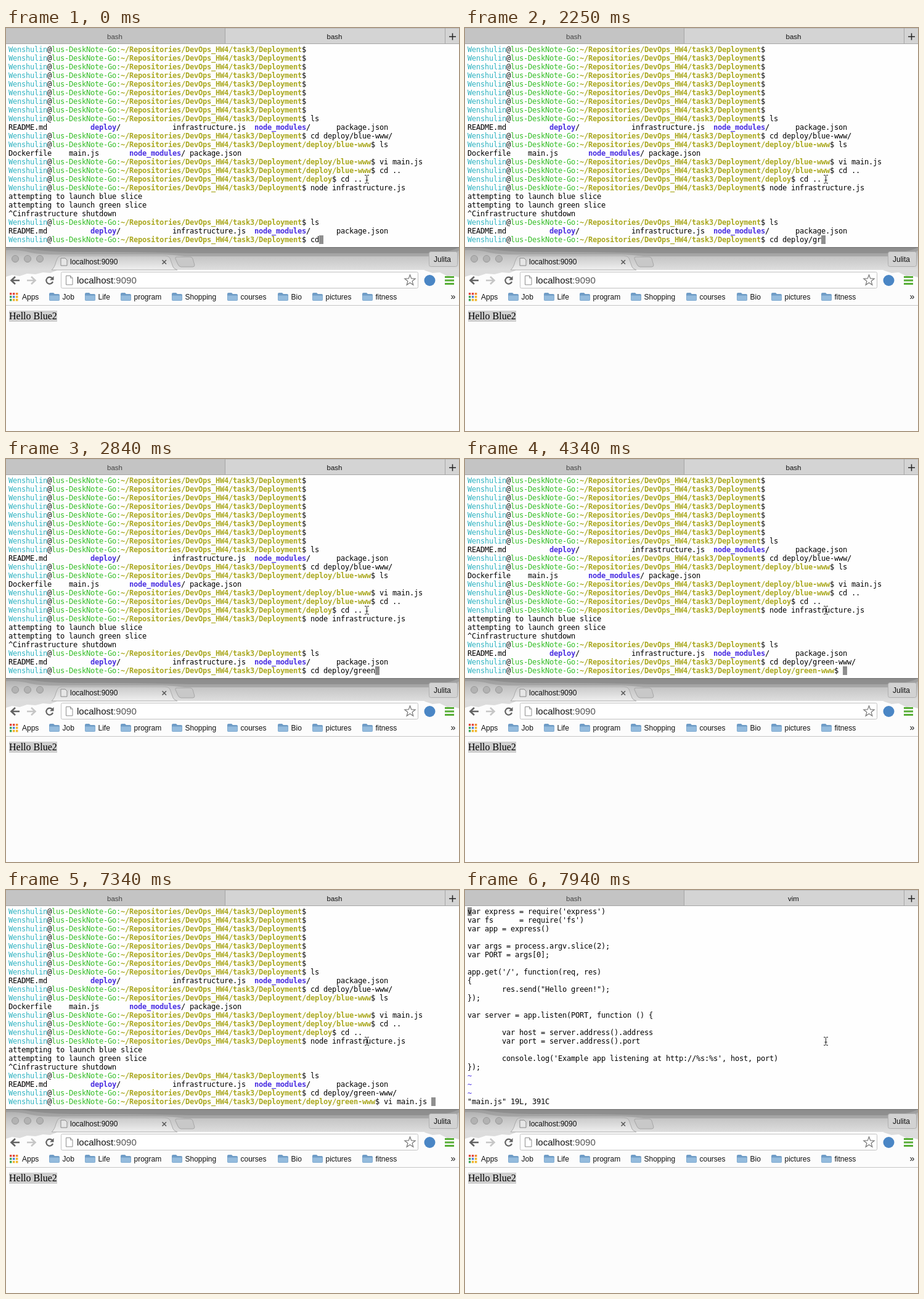
An HTML page for the animation above (8000 ms loop, 735x653 px).

```html
<!DOCTYPE html>
<html lang="en">
<head>
<meta charset="utf-8">
<title>Terminal and browser</title>
<style>
  html, body { margin: 0; width: 100%; height: 100%; overflow: hidden; background: #fcfcfc; }
  #stage { position: absolute; left: 0; top: 0; width: 735px; height: 653px; overflow: hidden; }
  svg { position: absolute; left: 0; top: 0; }
  svg text { font: 12px "Liberation Sans", Arial, sans-serif; fill: #111; }
  svg .title { font-size: 11.5px; text-anchor: middle; }
  svg .url { font-size: 15px; }
  svg .page { font: 16px "Liberation Serif", Times, serif; fill: #000; }
  #term { position: absolute; left: 0; top: 26px; width: 735px; height: 329px; background: #fefefe; }
  #screen {
    position: absolute; left: 4px; top: 2px; margin: 0; color: #000;
    font: 12px/14px "DejaVu Sans Mono", monospace;
    letter-spacing: calc(7px - 1ch); white-space: pre; font-variant-ligatures: none;
  }
  #caret { position: absolute; width: 7px; height: 14px; background: #8f8f8f; }
  #flash { position: absolute; left: 0; top: 3px; right: 0; bottom: 0; background: #9b9b9b; opacity: 0; }
  .user { color: #2fb3c1; }
  .host { color: #34bd26; }
  .path { color: #aaa820; font-weight: bold; }
  .dir { color: #492ee1; font-weight: bold; }
  .tilde { color: #492ee1; }
</style>
</head>
<body>
<div id="stage">
  <svg width="735" height="653" viewBox="0 0 735 653">
    <defs>
      <linearGradient id="strip" x1="0" y1="0" x2="0" y2="1">
        <stop offset="0" stop-color="#a9a9a9"/>
        <stop offset=".45" stop-color="#c6c6c6"/>
        <stop offset="1" stop-color="#dedede"/>
      </linearGradient>
      <linearGradient id="tab" x1="0" y1="0" x2="0" y2="1">
        <stop offset="0" stop-color="#c9c9c9"/>
        <stop offset="1" stop-color="#f0f0f0"/>
      </linearGradient>
      <g id="folder">
        <path d="M0 2q0-2 2-2h5l2 2h6q2 0 2 2v7q0 2-2 2H2q-2 0-2-2z" fill="#6f9cc6"/>
        <path d="M.5 4.5h16V11q0 1.5-1.5 1.5H2Q.5 12.500 .5 11z" fill="#94bbdd"/>
      </g>
    </defs>

    <!-- browser -->
    <rect y="392" width="735" height="261" fill="#fcfcfc"/>
    <path d="M0 388H84L82 393 72 397 60 396 48 399 34 398 22 402 10 400 0 403z" fill="#dcdcdc"/>
    <path d="M672 388H735V404L724 401 716 402 704 396 692 397 680 393z" fill="#dcdcdc"/>
    <rect y="355" width="735" height="37" fill="url(#strip)"/>
    <path d="M74 392Q79 388 81 379L84 372Q86 369 91 369H258Q264 369 266 373L271 387Q273 391 278 392z" fill="url(#tab)" stroke="#aaa"/>
    <path d="M277 371H299Q302 371 303 374L306 384Q306 387 303 387H284Q281 387 279 383L275 374Q274 371 277 371z" fill="#c8c8c8" stroke="#a6a6a6"/>
    <path d="M0 355H735V360Q728 369 690 370H290Q270 367 250 367H100Q60 368 40 364 20 359 0 360z" fill="#939393" opacity=".55"/>
    <path d="M20 355H735Q722 364 680 365H300Q180 362 110 363 60 363 20 355z" fill="#828282" opacity=".6"/>
    <g fill="#b2b2b2" stroke="#999">
      <circle cx="15" cy="374" r="5.500"/><circle cx="35" cy="374" r="5.500"/><circle cx="55" cy="374" r="5.500"/>
    </g>
    <path d="M89 373h7l3 3v9H89z" fill="#e6e6e6" stroke="#888"/>
    <text x="104" y="383">localhost:9090</text>
    <path d="M253.500 376l6.500 6.500m0-6.500l-6.500 6.500" stroke="#555" stroke-width="1.500"/>
    <rect x="686.500" y="362.500" width="46" height="24" rx="3" fill="#d2d2d2" stroke="#b0b0b0"/>
    <text x="694" y="379">Julita</text>

    <!-- toolbar -->
    <g fill="none" stroke-width="2.600">
      <path d="M22 409H9m6-6l-6.500 6 6.500 6" stroke="#636363"/>
      <path d="M34 409H47m-6-6l6.500 6-6.500 6" stroke="#c6c6c6"/>
      <path d="M75 405.500A5.500 5.500 0 1 0 76 411" stroke="#636363" stroke-width="2.200"/>
    </g>
    <path d="M77.500 402v6.500h-6.500z" fill="#636363"/>
    <rect x="89.500" y="395.500" width="579" height="26" rx="2" fill="#fff" stroke="#c2c2c2"/>
    <path d="M97.500 401.500h7l3.500 3.500v11H97.500zM104.500 401.500v3.500h3.500" fill="#fff" stroke="#8d8d8d"/>
    <text class="url" x="115" y="414">localhost<tspan fill="#555">:9090</tspan></text>
    <path id="star" fill="#fff" stroke="#777" stroke-width="1.200"/>
    <circle cx="687.500" cy="409" r="9" fill="#4a86c5"/>
    <path d="M712 403.500h15m-15 5.500h15m-15 5.500h15" stroke="#58ae37" stroke-width="3"/>
    <g id="apps"></g>
    <text x="26" y="440">Apps</text>
    <g id="marks"></g>
    <text x="721.500" y="440" style="font-size:14px">»</text>
    <path d="M0 449.500H735" stroke="#c6c6c6"/>

    <rect x="5" y="458" width="78" height="18" fill="#cfcfcf"/>
    <text class="page" x="5" y="472">Hello Blue2</text>

    <!-- terminal tabs -->
    <rect width="735" height="26" fill="#d4d4d4"/>
    <rect width="355" height="26" fill="#c4c4c4"/>
    <path d="M0 .5H735" stroke="#bcbcbc"/>
    <path d="M355.500 0V26M712.500 0V26M0 25.500H735" stroke="#a5a5a5"/>
    <path d="M719 14h11m-5.500-5.500v11" stroke="#222" stroke-width="1.500"/>
    <text class="title" x="176.500" y="18" style="fill:#444">bash</text>
    <text class="title" id="title" x="533" y="18">bash</text>
  </svg>

  <div id="term">
    <div id="caret"></div>
    <pre id="screen"></pre>
    <div id="flash"></div>
  </div>

  <svg width="735" height="653" viewBox="0 0 735 653">
    <path d="M0 355.500H735" stroke="#6e6e6e"/>
    <path d="M582 238.500h2.500l1 1 1-1H589M582 251.500h2.500l1-1 1 1H589M585.500 239.500v11M583.500 246.500h4" fill="none" stroke="#222"/>
  </svg>
</div>

<script>
const $ = id => document.getElementById(id);
const LOOP = 8000, ROWS = 23, CELL_W = 7, CELL_H = 14;

// ---- static parts of the toolbar ----
$('star').setAttribute('d', 'M' + Array.from({ length: 10 }, (_, i) => {
  const r = i % 2 ? 3.8 : 9, a = i * Math.PI / 5;
  return (655.5 + r * Math.sin(a)).toFixed(1) + ' ' + (409 - r * Math.cos(a)).toFixed(1);
}).join('L') + 'z');

const dots = ['#e2463c', '#e2463c', '#ee8a2c', '#3da555', '#4b80dc', '#efb427', '#3da555', '#efb427', '#efb427'];
$('apps').innerHTML = dots.map((c, i) =>
  `<rect x="${6 + i % 3 * 5}" y="${429 + Math.floor(i / 3) * 5}" width="3.4" height="3.4" fill="${c}"/>`).join('');

const marks = { Job: 70, Life: 128, program: 186, Shopping: 269, courses: 359, Bio: 441, pictures: 497, fitness: 578 };
$('marks').innerHTML = Object.entries(marks).map(([name, x]) =>
  `<use href="#folder" x="${x}" y="429"/><text x="${x + 21.5}" y="440">${name}</text>`).join('');

// ---- terminal content ----
const USER = 'Wenshulin', HOST = 'lus-DeskNote-Go:', ROOT = '~/Repositories/DevOps_HW4/task3/Deployment';
const span = (cls, s) => `<span class="${cls}">${s}</span>`;
const prompt = (cmd = '', sub = '') =>
  span('user', USER) + '@' + span('host', HOST) + span('path', ROOT + sub) + '$ ' + cmd;
const promptLength = sub => (USER + '@' + HOST + ROOT + sub + '$ ').length;

const gap = n => ' '.repeat(n);
const modules = span('dir', 'node_modules') + '/';
const rootList = 'README.md' + gap(10) + span('dir', 'deploy') + '/' + gap(12) +
  'infrastructure.js' + gap(2) + modules + gap(6) + 'package.json';
const blueList = 'Dockerfile' + gap(4) + 'main.js' + gap(7) + modules + ' package.json';
const BLUE = '/deploy/blue-www', GREEN = '/deploy/green-www';

const history = [
  ...Array(8).fill(prompt()),
  prompt('ls'), rootList,
  prompt('cd deploy/blue-www/'),
  prompt('ls', BLUE), blueList,
  prompt('vi main.js', BLUE),
  prompt('cd ..', BLUE),
  prompt('cd ..', '/deploy'),
  prompt('node infrastructure.js'),
  'attempting to launch blue slice',
  'attempting to launch green slice',
  '^Cinfrastructure shutdown',
  prompt('ls'), rootList
];
// lines 3 to 8 of the prompt block are identical, so the block can simply scroll
history[8] = prompt();
history.splice(9, 0, prompt('ls'));
history.splice(0, history.length - 22);

const editor = `var express = require('express')
var fs      = require('fs')
var app = express()

var args = process.argv.slice(2);
var PORT = args[0];

app.get('/', function(req, res)
{
        res.send("Hello green!");
});

var server = app.listen(PORT, function () {

        var host = server.address().address
        var port = server.address().port

        console.log('Example app listening at http://%s:%s', host, port)
});
${(span('tilde', '~') + '\n').repeat(3)}"main.js" 19L, 391C`;

// ---- timeline: [start, characters typed so far] ----
const CD = 'cd deploy/green-www/', VI = 'vi main.js ';
const cdSteps = [[0, 2], [150, 3], [450, 4], [600, 5], [1050, 10], [1950, 11], [2250, 12],
  [2400, 13], [2550, 15], [3440, 16], [3740, 17], [3890, 20]];
const viSteps = [[4340, 0], [5990, 1], [6140, 2], [6290, 3], [6590, 4], [6890, 6], [7340, 11]];
const RUN = 7790, EDIT = 7940;
const flashSteps = [[0, 0], [2550, .2], [2700, .4], [2840, 0]];
const at = (steps, t) => steps.filter(s => s[0] <= t).pop()[1];

function view(t) {
  if (t >= EDIT) return { html: editor, col: 0, row: 0, title: 'vim' };
  const lines = [...history];
  let col;
  if (t < viSteps[0][0]) {
    const n = at(cdSteps, t);
    lines.push(prompt(CD.slice(0, n)));
    col = promptLength('') + n;
  } else {
    const n = at(viSteps, t);
    lines.push(prompt(CD), prompt(VI.slice(0, n), GREEN));
    col = promptLength(GREEN) + n;
    if (t >= RUN) {
      lines.push('');
      col = 0;
    }
  }
  return { html: lines.slice(-ROWS).join('\n'), col, row: ROWS - 1, title: 'bash' };
}

let shown;
function draw(t) {
  const v = view(t);
  $('flash').style.opacity = at(flashSteps, t);
  if (v.html === shown) return;
  shown = v.html;
  $('screen').innerHTML = v.html;
  $('title').textContent = v.title;
  $('caret').style.left = 4 + v.col * CELL_W + 'px';
  $('caret').style.top = 2 + v.row * CELL_H + 'px';
}

const start = performance.now();
function tick(now) {
  draw(Math.max(0, now - start) % LOOP);
  requestAnimationFrame(tick);
}
draw(0);
requestAnimationFrame(tick);
</script>
</body>
</html>
```
